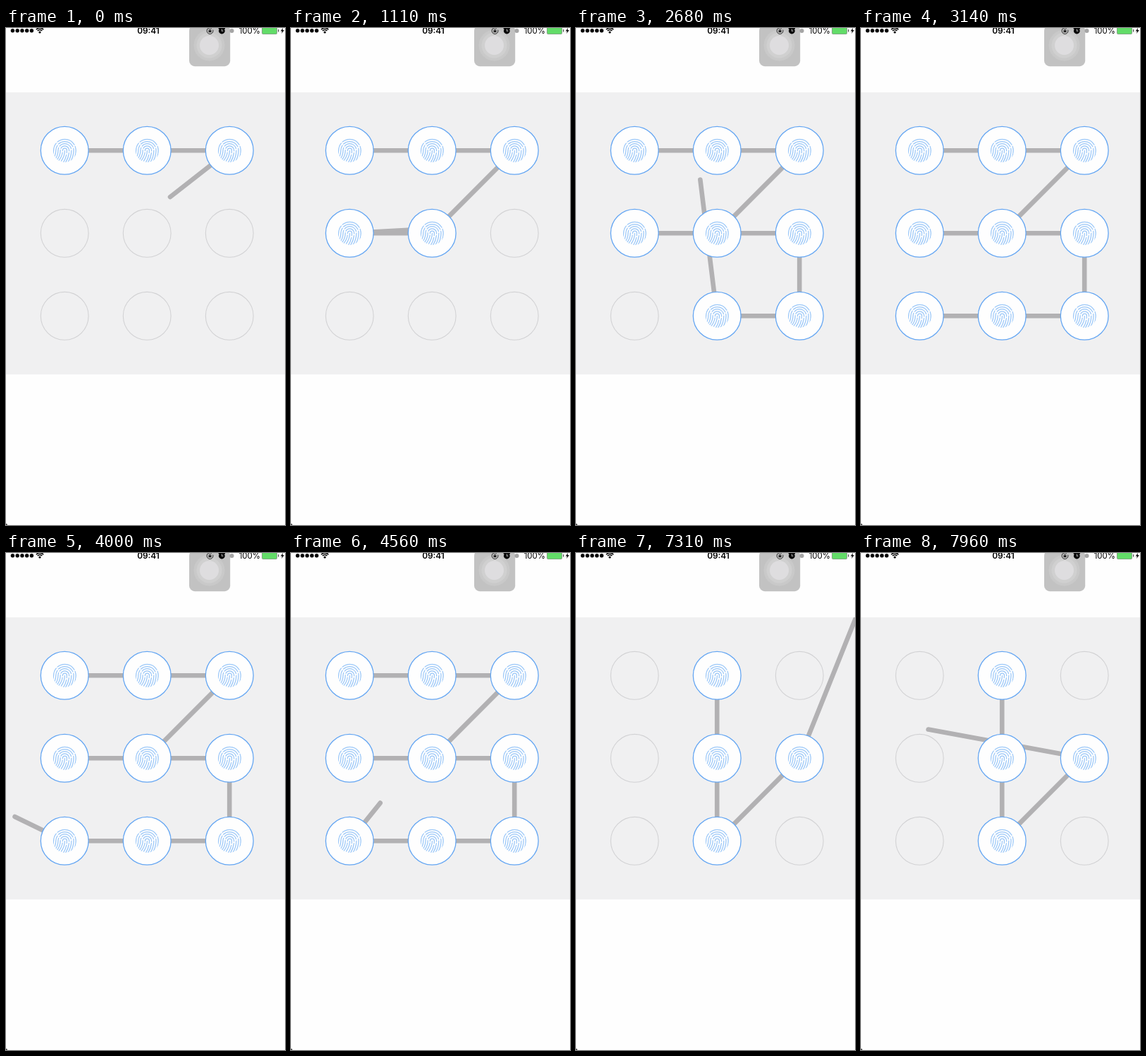
An HTML page with a canvas for the animation above (7990 ms loop, 396 by 703 pixels).

```html
<!DOCTYPE html>
<html lang="en">
<head>
<meta charset="utf-8">
<title>Pattern lock</title>
<style>
  html, body { margin: 0; width: 100%; height: 100%; overflow: hidden; background: #fefefe; }
  canvas { display: block; }
</style>
</head>
<body>
<canvas id="stage" width="396" height="703"></canvas>
<script>
const ctx = document.getElementById('stage').getContext('2d');
const LOOP = 7990;
const RADIUS = 33.9;
const TAU = Math.PI * 2;
const dots = Array.from({ length: 9 }, (_, i) => ({
  x: 83.2 + 117 * (i % 3),
  y: 173.3 + 117 * Math.floor(i / 3)
}));

const at = (t, node) => ({ t, ...dots[node] });
const free = (t, x, y) => ({ t, x, y });

// The finger travels from stop to stop; lit holds the nodes joined beforehand.
const gestures = [
  {
    lit: [0, 1, 2], end: 4800,
    stops: [
      free(0, 233, 239), free(60, 233, 239), at(150, 4), at(350, 3), at(820, 3),
      at(1400, 5), free(1610, 317, 347), at(1760, 8), free(2160, 208.5, 453.5),
      at(2350, 7), free(2680, 176.5, 214.5), at(3050, 6), free(3450, 130, 345),
      free(4000, 12.5, 373), free(4450, 130, 340), at(4800, 6)
    ]
  },
  {
    lit: [], end: LOOP,
    stops: [
      at(5720, 1), at(5880, 1), at(6380, 7), at(6520, 7), at(6920, 5),
      free(7310, 399, 87), free(7550, 399, 87), free(7960, 95.5, 249.5), free(LOOP, 95.5, 249.5)
    ]
  }
];

// Smooth cubic path; the finger comes to rest where a stop repeats.
function fingerAt(stops, t) {
  const last = stops.length - 1;
  let i = 0;
  while (i < last - 1 && t >= stops[i + 1].t) i++;
  const a = stops[i], b = stops[i + 1];
  const span = b.t - a.t;
  const u = Math.min(1, Math.max(0, (t - a.t) / span));
  const u2 = u * u, u3 = u2 * u;
  const same = (p, q) => p !== q && p.x === q.x && p.y === q.y;
  const slope = (k, axis) => {
    const p = stops[Math.max(0, k - 1)], q = stops[Math.min(last, k + 1)];
    if (same(p, stops[k]) || same(q, stops[k])) return 0;
    return (q[axis] - p[axis]) / (q.t - p.t) * span;
  };
  const blend = axis =>
    a[axis] * (2 * u3 - 3 * u2 + 1) + slope(i, axis) * (u3 - 2 * u2 + u) +
    b[axis] * (3 * u2 - 2 * u3) + slope(i + 1, axis) * (u3 - u2);
  return { x: blend('x'), y: blend('y') };
}

// Walk each path once to find when the finger reaches every node.
for (const g of gestures) {
  const start = g.stops[0].t;
  g.hits = g.lit.map(node => ({ node, t: start }));
  for (let t = start; t < g.end; t += 10) {
    const f = fingerAt(g.stops, t);
    dots.forEach((d, node) => {
      const known = g.hits.some(h => h.node === node);
      if (!known && Math.hypot(f.x - d.x, f.y - d.y) < RADIUS) g.hits.push({ node, t });
    });
  }
}

function disc(x, y, r, color) {
  ctx.fillStyle = color;
  ctx.beginPath();
  ctx.arc(x, y, r, 0, TAU);
  ctx.fill();
}

function ring(x, y, r, color, width, from = 0, to = TAU) {
  ctx.strokeStyle = color;
  ctx.lineWidth = width;
  ctx.beginPath();
  ctx.arc(x, y, r, from, to);
  ctx.stroke();
}

function box(x, y, w, h, r, color) {
  ctx.fillStyle = color;
  ctx.beginPath();
  ctx.roundRect(x, y, w, h, r);
  ctx.fill();
}

function label(text, x, weight, size) {
  ctx.fillStyle = '#000';
  ctx.textAlign = 'center';
  ctx.font = `${weight} ${size}px Inter, Roboto, sans-serif`;
  ctx.fillText(text, x, 8.2);
}

// Nested arches whose legs all sweep down to the left.
function fingerprint(x, y) {
  ctx.save();
  ctx.translate(x + 0.2, y - 0.2);
  ctx.beginPath();
  ctx.arc(0, 0, 16.8, 0, TAU);
  ctx.clip();
  ctx.strokeStyle = '#9ac7f8';
  ctx.lineWidth = 1.25;
  ctx.lineCap = 'round';
  for (let r = 3; r < 17; r += 3.2) {
    ctx.setLineDash([r * 1.1 + 10, 2.6]);
    ctx.beginPath();
    ctx.moveTo(-r - 6, 15);
    ctx.quadraticCurveTo(-r, 8, -r, 0);
    ctx.arc(0, 0, r, Math.PI, TAU);
    ctx.quadraticCurveTo(r, 9, r - 5, 17);
    ctx.stroke();
  }
  ctx.setLineDash([]);
  ctx.beginPath();
  ctx.moveTo(0, 0.5);
  ctx.quadraticCurveTo(0, 8, -5, 15);
  ctx.stroke();
  ctx.restore();
}

function assistButton() {
  box(260, -4, 58.2, 58.2, 8, '#c2c2c2');
  disc(288.5, 24.5, 22, '#c9c9c9');
  disc(288.5, 24.5, 18, '#d0d0d0');
  disc(288.5, 24.5, 13.5, '#dedddf');
}

function statusBar() {
  for (let i = 0; i < 5; i++) disc(9.4 + i * 6.75, 3.7, 2.7, '#000');

  for (const r of [4.4, 7]) ring(48, 7, r, '#000', 1.5, -2.4, -0.74);
  disc(48, 6, 1.6, '#000');

  label('09:41', 202, 600, 11.8);
  label('100%', 345.8, 400, 11.4);

  // rotation lock
  ring(289.5, 4, 4.4, '#222', 1, -0.3, 5.3);
  ring(289.5, 3, 1.3, '#222', 0.8, Math.PI, TAU);
  box(287.5, 3.2, 4, 3, 0, '#222');

  // alarm
  disc(306.3, 4, 4.4, '#000');
  for (const side of [-1, 1]) disc(306.3 + side * 3.4, 0.4, 1.3, '#000');
  box(305.9, 1.2, 0.9, 3.4, 0, '#c2c2c2');
  box(305.9, 3.7, 2.6, 0.9, 0, '#c2c2c2');

  disc(320.5, 4, 3, '#a5a5a5');

  // battery
  box(363, -2, 22, 11, 2, '#8b998c');
  box(363.8, -2, 20.4, 10.2, 1.3, '#62dc68');
  box(386, 2, 1.3, 3.5, 0, '#555');

  const bolt = new Path2D('M393 0 L389.8 4.4 H392 L391 8 L394.8 3 H392.6 Z');
  ctx.fillStyle = '#000';
  ctx.fill(bolt);
}

function pattern(points) {
  ctx.save();
  ctx.strokeStyle = '#b2b1b3';
  ctx.lineWidth = 6.6;
  ctx.lineCap = ctx.lineJoin = 'round';
  ctx.beginPath();
  for (const { x, y } of points) ctx.lineTo(x, y);
  ctx.stroke();
  ctx.restore();
}

function lockPanel(t) {
  ctx.save();
  ctx.beginPath();
  ctx.rect(0, 91, 396, 399);
  ctx.clip();
  ctx.fillStyle = '#f0f0f1';
  ctx.fillRect(0, 91, 396, 399);

  const active = gestures.find(g => t >= g.stops[0].t && t < g.end);
  const lit = active ? active.hits.filter(h => h.t <= t).map(h => h.node) : [];
  if (active) pattern([...lit.map(n => dots[n]), fingerAt(active.stops, t)]);

  dots.forEach(({ x, y }, i) => {
    if (lit.includes(i)) {
      disc(x, y, RADIUS, '#fefefe');
      ring(x, y, RADIUS, '#64a6f3', 1.3);
      fingerprint(x, y);
    } else {
      ring(x, y, RADIUS, '#d2d2d4', 1.1);
    }
  });
  ctx.restore();
}

function draw(t) {
  ctx.fillStyle = '#fefefe';
  ctx.fillRect(0, 0, 396, 703);
  lockPanel(t);
  assistButton();
  statusBar();
  disc(0, 703, 2, '#444');
}

const began = performance.now();
function tick() {
  draw((performance.now() - began) % LOOP);
  requestAnimationFrame(tick);
}
tick();
</script>
</body>
</html>
```
